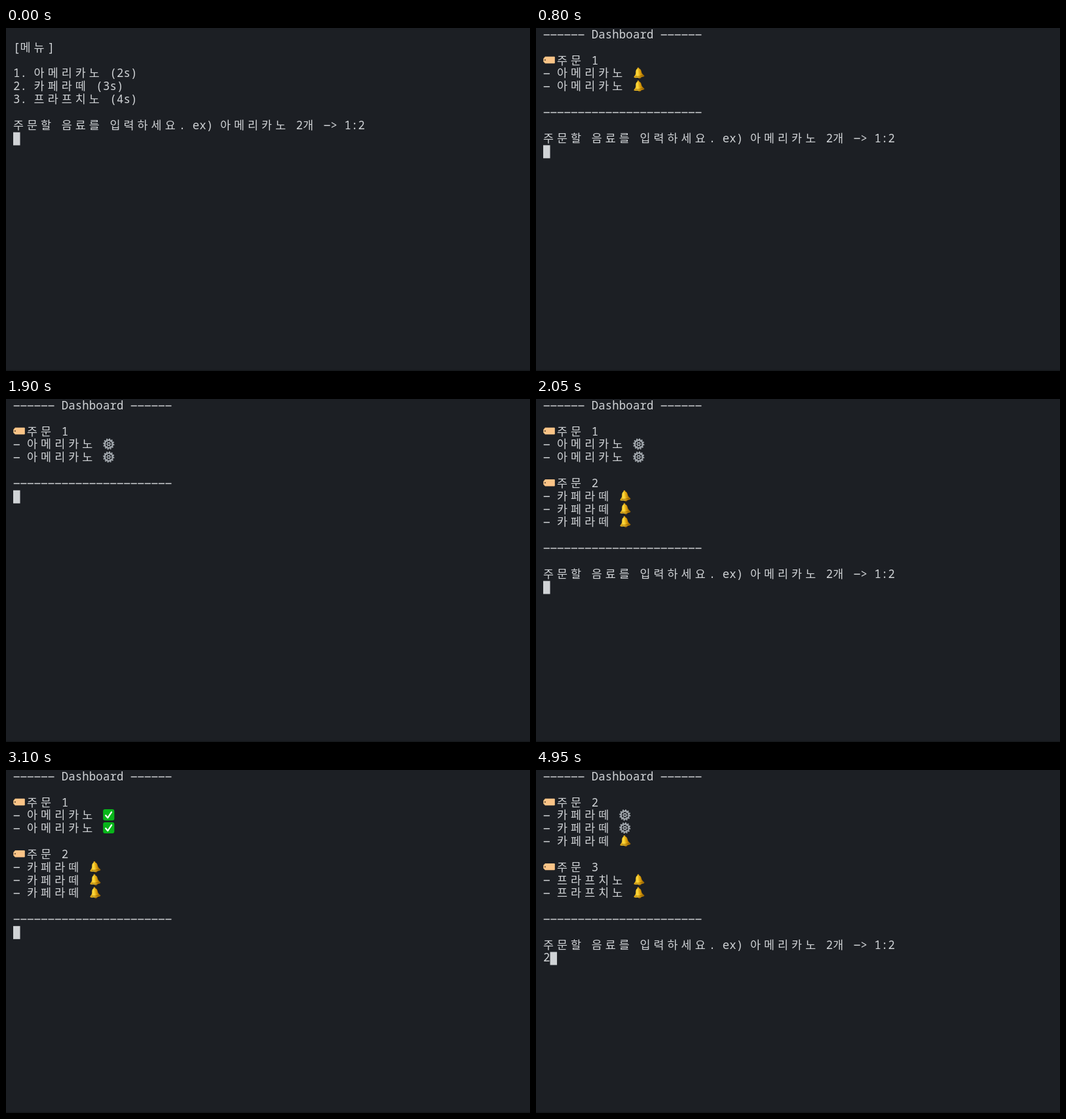
Write an HTML page that moves like this. It is 800 px wide and 525 px high and loops after 5 s.

```html
<!DOCTYPE html>
<html lang="ko">
<head>
<meta charset="utf-8">
<title>Dashboard</title>
<style>
  html, body { margin: 0; width: 100%; height: 100%; overflow: hidden; background: #1c1f24; }
  svg { display: block; width: 100vw; height: 100vh; }
  text { font: 17.4px "Noto Sans Mono", "Noto Sans CJK KR", "Noto Sans CJK", monospace; fill: #d0d3d6; }
  .dash { stroke: #d0d3d6; stroke-width: 1.5; }
</style>
</head>
<body>
<svg viewBox="0 0 800 525">
  <defs>
    <linearGradient id="gold" x1="0" x2="1">
      <stop offset="0" stop-color="#e0a010"/>
      <stop offset=".38" stop-color="#ffdc3c"/>
      <stop offset=".65" stop-color="#d99a08"/>
      <stop offset="1" stop-color="#8a5a05"/>
    </linearGradient>
    <g id="tag">
      <path d="M3 3.2H16.8Q17.8 3.2 17.8 4.2V12.6Q17.8 13.6 16.8 13.6H3L.3 10.8V6Z" fill="#fbc487"/>
      <circle cx="2.9" cy="8.4" r="1" fill="#4a382a"/>
    </g>
    <g id="bell" transform="rotate(-7 9 9)">
      <circle cx="9" cy="1.4" r="1.5" fill="#d9a017"/>
      <ellipse cx="9.5" cy="15.3" rx="2.5" ry="1.9" fill="#8b5d0c"/>
      <path d="M9 1.6C5.4 1.8 4.8 4.8 4.5 7.8C4.2 10.4 2.6 11.5 1 13.2Q.5 14.8 2.5 15Q9 16 15.6 15Q17.5 14.6 17 13.2C15.3 11.5 13.9 10.4 13.5 7.8C13.2 4.8 12.6 1.8 9 1.6Z" fill="url(#gold)"/>
      <path d="M3 13.1Q9 14.4 15 13.1" fill="none" stroke="#8f6206" stroke-width=".9"/>
    </g>
    <g id="gear" fill="none" stroke="#a7adb3">
      <circle cx="8.9" cy="8.5" r="7.7" stroke-width="1.7" stroke-dasharray="2.1 1.932"/>
      <circle cx="8.9" cy="8.5" r="6.1" stroke-width="2.1"/>
      <circle cx="8.9" cy="8.5" r="2" stroke-width="1.4"/>
      <path d="M11 8.5H14M7.85 10.3L6.35 12.9M7.85 6.7L6.35 4.1M9.95 6.7L11.45 4.1M9.95 10.3L11.45 12.9M6.8 8.5H3.8" stroke-width="1.1"/>
    </g>
    <g id="check">
      <rect x=".3" y="-.4" width="17.2" height="17.2" rx="3" fill="#08b51a"/>
      <path d="M4.3 9L7.5 12.7L13.2 4" fill="none" stroke="#fff" stroke-width="2.2" stroke-linecap="round" stroke-linejoin="round"/>
    </g>
  </defs>
  <rect width="800" height="525" fill="#1c1f24"/>
  <rect y="523.6" width="800" height="1.4" fill="#15171b"/>
  <g id="screen"></g>
</svg>
<script>
const LOOP = 5000;
const CELL = 10.53, ROW = 19.82, LEFT = 11, TOP = 1;
const ICONS = { '🏷': 'tag', '🔔': 'bell', '⚙': 'gear', '✅': 'check' };
const PROMPT = '주문할 음료를 입력하세요. ex) 아메리카노 2개 -> 1:2';
const MENU = ['', '[메뉴]', '', '1. 아메리카노 (2s)', '2. 카페라떼 (3s)', '3. 프라프치노 (4s)', ''];

const order = (number, drink, icons) =>
  [`🏷주문 ${number}`, ...[...icons].map(icon => `- ${drink} ${icon}`), ''];
const dashboard = (...orders) =>
  ['------ Dashboard ------', '', ...orders.flat(), '-'.repeat(23)];
const ask = (lines, typed) => [...lines, PROMPT, typed];

const americano = icons => order(1, '아메리카노', icons);
const latte = icons => order(2, '카페라떼', icons);
const frappe = order(3, '프라프치노', '🔔🔔');

const first = [...dashboard(americano('🔔🔔')), ''];
const second = [...dashboard(americano('⚙⚙'), latte('🔔🔔🔔')), ''];
const third = [...dashboard(latte('⚙⚙🔔'), frappe), ''];

// [start time, terminal lines]; the cursor follows the last line
const timeline = [
  [0, ask(MENU, '')],
  [150, ask(MENU, '1')],
  [350, ask(MENU, '1:')],
  [600, ask(MENU, '1:2')],
  [800, ask(first, '')],
  [1200, ask(first, '2')],
  [1400, ask(first, '2:')],
  [1650, ask(first, '2:3')],
  [1900, [...dashboard(americano('⚙⚙')), '']],
  [2000, ask(second, '')],
  [2400, ask(second, '3')],
  [2600, ask(second, '3:')],
  [2800, ask(second, '3:2')],
  [3000, [...dashboard(americano('✅✅'), latte('🔔🔔🔔')), '']],
  [3200, ask(third, '')],
  [4750, ask(third, '2')]
];

const cellsOf = char => /[가-힣]/.test(char) || ICONS[char] ? 2 : 1;
const escapeChar = char => char === '>' ? '&gt;' : char;

function drawLine(line, row) {
  const top = TOP + row * ROW;
  const xs = [];
  let col = 0, text = '', marks = '';
  for (const char of line) {
    const x = (LEFT + col * CELL).toFixed(2);
    if (ICONS[char]) {
      marks += `<use href="#${ICONS[char]}" x="${x}" y="${top}"/>`;
    } else if (char === '-') {
      marks += `<path class="dash" d="M${+x + .7} ${top + 9.5}h9.2"/>`;
    } else if (char !== ' ') {
      text += escapeChar(char);
      xs.push(x);
    }
    col += cellsOf(char);
  }
  const label = text && `<text x="${xs.join(' ')}" y="${top + 15}">${text}</text>`;
  return { svg: marks + label, col };
}

function drawScreen(lines) {
  const drawn = lines.map(drawLine);
  const x = LEFT + drawn.at(-1).col * CELL;
  const y = TOP + (lines.length - 1) * ROW;
  return drawn.map(line => line.svg).join('') +
    `<rect x="${x}" y="${y}" width="${CELL}" height="20" fill="#d0d3d6"/>`;
}

const screen = document.getElementById('screen');
const startTime = performance.now();
let shown = null;

function update() {
  const time = (performance.now() - startTime) % LOOP;
  const state = timeline.findLast(([start]) => start <= time);
  if (state !== shown) {
    screen.innerHTML = drawScreen(state[1]);
    shown = state;
  }
  requestAnimationFrame(update);
}
update();
</script>
</body>
</html>
```
